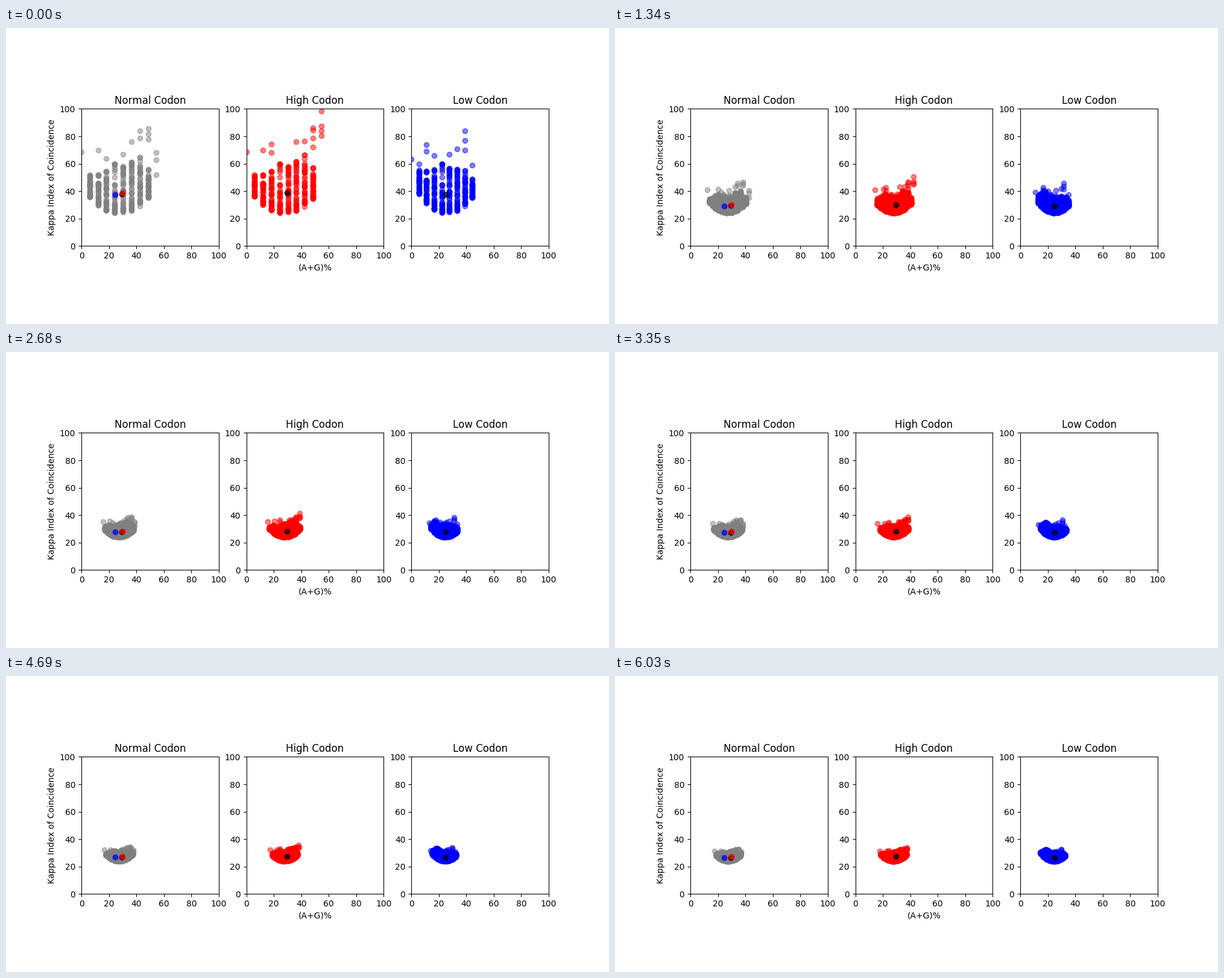
A matplotlib script for the animation above (6.7 s loop, 1000x492 px).

```python
from math import ceil, exp, floor

import numpy as np
import matplotlib.pyplot as plt
from matplotlib.animation import FuncAnimation
from matplotlib.colors import to_rgba

FRAMES = 10
INTERVAL = 670
plt.rcParams["text.kerning_factor"] = 6


class Panel:
    """One cloud; it settles like 1/m as the window grows m-fold."""

    def __init__(self, ax, title, color, window, mid, half, spread,
                 dip, peak, lift, swell, tips):
        self.window = window                  # first window length
        self.mid, self.half, self.spread = mid, half, spread
        self.dip = dip                        # lowest place, in half widths
        self.peak = peak                      # tallest place, in half widths
        self.lift, self.swell = lift, swell   # late and early peak height
        self.tips = tips                      # highest points at the start
        ax.set(xlim=(0, 100), ylim=(0, 100), aspect="equal", title=title)
        self.dots = ax.scatter([], [], color=to_rgba(color, 0.5))

    def width(self, m):
        return self.half + self.spread / m

    def bottom(self, u, m):
        return 24 + (3 + 14 / m) * abs(u - self.dip) ** 2.2

    def top(self, u, m):
        bump = exp(-((u - self.peak) / 0.35) ** 2)
        level = 27 + 33 / m + (self.lift + self.swell / m) * bump
        low = self.bottom(u, m)
        return low + max(level - low, 1) * (1 - 0.5 * u ** 4)

    def points(self, m):
        rng = np.random.default_rng(17 + m)
        width = self.width(m)
        step = 100 / (self.window * m)
        result = []
        first, last = ceil((self.mid - width) / step), floor((self.mid + width) / step)
        for k in range(first, last + 1):
            u = (k * step - self.mid) / width
            low, high = self.bottom(u, m), self.top(u, m)
            high = low + (high - low) * rng.uniform(0.85, 1.08)
            heights = low + (high - low) * rng.random(40) ** 1.4
            result += [(k * step, y) for y in heights]
        shrink = width / self.width(1)
        for x, y in self.tips:
            x = self.mid + (x - self.mid) * shrink
            result.append((round(x / step) * step, 27 + (y - 27) / m))
        return result


class Mean:
    """Marker whose height falls towards a limit."""

    def __init__(self, ax, color, x, limit, drop):
        self.x, self.limit, self.drop = x, limit, drop
        self.dot = ax.scatter([], [], color=to_rgba(color, 0.75))

    def move(self, m):
        self.dot.set_offsets([(self.x, self.limit + self.drop / m)])


fig, (left, middle, right) = plt.subplots(1, 3, figsize=(10, 4.92), dpi=100)
left.set_ylabel("Kappa Index of Coincidence")
middle.set_xlabel("(A+G)%")

panels = [
    Panel(left, "Normal Codon", "grey", 16.5, 27.5, 7.5, 18, 0, 0.6, 1.2, 8,
          [(0, 68.5), (12, 70), (18, 64), (30, 67), (36, 76), (42, 78.5),
           (42, 84), (48, 78), (48, 82), (48, 85.7), (54, 52), (54, 63),
           (54, 68)]),
    Panel(middle, "High Codon", "red", 16.5, 28, 7.5, 18, 0, 0.6, 2, 9,
          [(0, 68.5), (12, 70), (18, 68), (18, 74.5), (36, 76), (42, 76.5),
           (48, 72), (48, 78.5), (48, 84.5), (48, 86), (54, 80.5), (54, 84),
           (54, 87.5), (54, 98.5)]),
    Panel(right, "Low Codon", "blue", 18, 23.75, 7.25, 15, 0.1, -0.7, 3, 0,
          [(0, 63.5), (6, 60), (11, 69), (11, 74), (17, 66), (28, 67),
           (33, 71), (39, 70), (39, 77), (39, 84), (44, 59)]),
]
means = [
    Mean(left, "black", 29.5, 25.3, 12.6),
    Mean(left, "red", 29.8, 25.9, 12.9),
    Mean(left, "blue", 24.7, 25.3, 12.1),
    Mean(middle, "black", 29.7, 25.9, 12.9),
    Mean(right, "black", 24.9, 25.3, 12.1),
]


def draw(n):
    m = n + 1
    for panel in panels:
        panel.dots.set_offsets(panel.points(m))
    for mean in means:
        mean.move(m)
    return [p.dots for p in panels] + [k.dot for k in means]


anim = FuncAnimation(fig, draw, frames=FRAMES, interval=INTERVAL,
                     repeat=True, repeat_delay=0)
plt.show()
```
